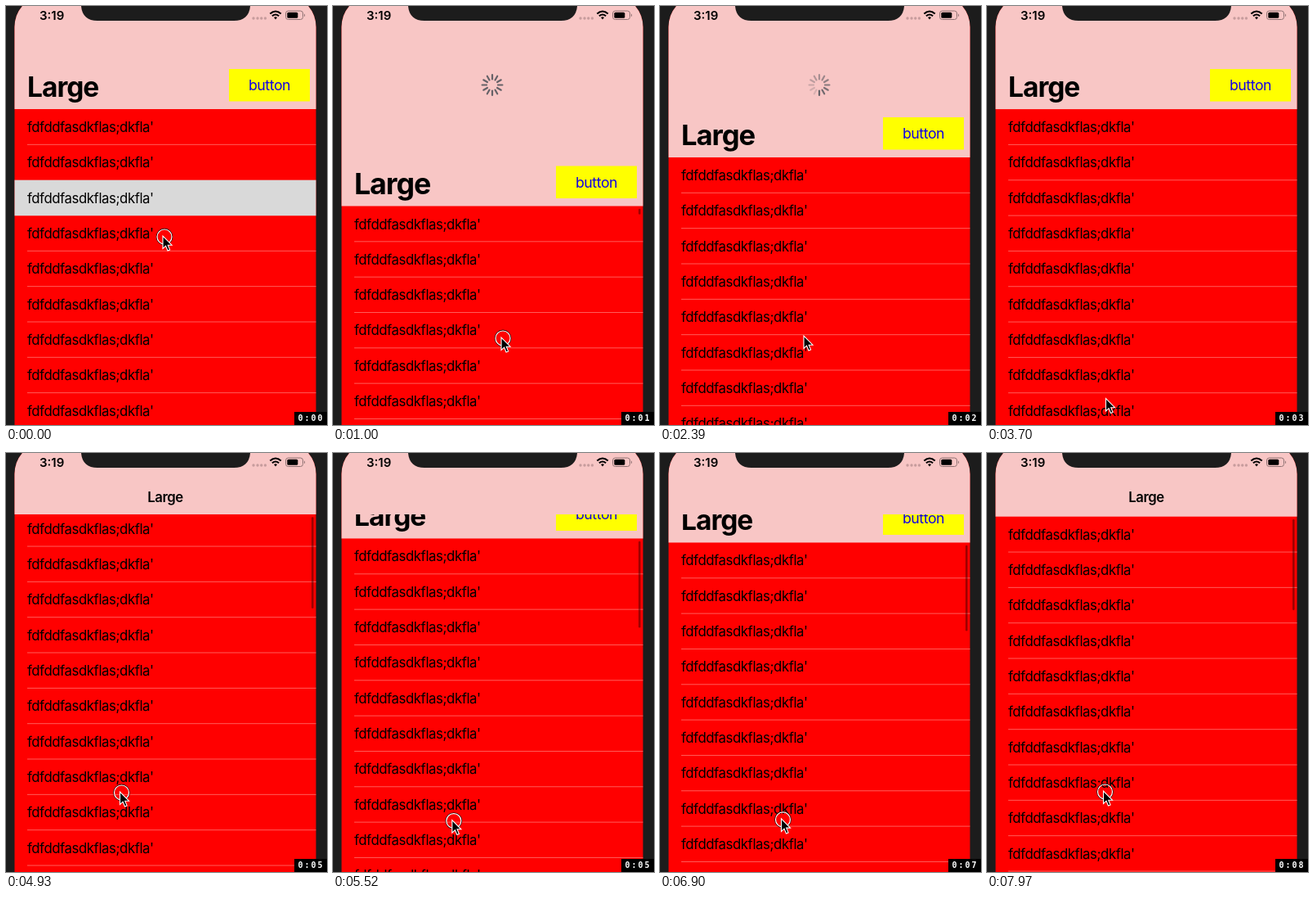
An HTML page that plays this animation: 393x512 px, repeating every 8000 ms.

```html
<!DOCTYPE html>
<html lang="en">
<head>
<meta charset="utf-8">
<title>Pull to refresh</title>
<style>
  html, body { margin: 0; width: 100%; height: 100%; overflow: hidden; background: #1c1c1c; }
  svg { display: block; width: 100%; height: 100%; }
  text { font-family: Inter, Roboto, sans-serif; font-optical-sizing: none; }
  .row { font-size: 16.75px; letter-spacing: -.42px; }
  .large { font-size: 33.5px; font-weight: 700; letter-spacing: -.03em; }
  .title { font-size: 16.75px; font-weight: 600; letter-spacing: -.42px; text-anchor: middle; }
  .button { font-size: 17.7px; letter-spacing: -.42px; text-anchor: middle; fill: #1200e6; }
  .time { font-size: 15px; font-weight: 600; }
  .clock { font: 700 10px "DejaVu Sans Mono", monospace; letter-spacing: 1.98px; fill: #fff; }
</style>
</head>
<body>
<svg viewBox="0 0 393 512">
  <defs>
    <clipPath id="screen"><path d="M10.5 512V26Q10.5 11 20 0H370Q379.5 11 379.5 26V512Z"/></clipPath>
    <clipPath id="belowBar"><rect y="75" width="393" height="437"/></clipPath>
  </defs>
  <rect width="393" height="512" fill="#1c1c1c"/>
  <g clip-path="url(#screen)">
    <rect width="393" height="512" fill="#f00"/>
    <g id="rows"><rect id="selected" x="10" y="86.66" width="370" height="43.6" fill="#d9d9d9"/></g>
    <rect id="header" width="393" height="126" fill="#f8c6c5"/>
    <rect id="bar" x="374" width="2.6" rx="1.3" fill="#000" fill-opacity=".38"/>
    <g id="spinner" stroke="#666268" stroke-width="2.2" stroke-linecap="round"></g>
    <g clip-path="url(#belowBar)">
      <g id="big">
        <text id="large" class="large">Large</text>
        <rect x="273" y="-49" width="99" height="39.5" fill="#ff0"/>
        <text class="button" x="322.5" y="-23">button</text>
      </g>
    </g>
    <text id="title" class="title" x="195" y="59.5">Large</text>
    <text class="time" x="41" y="16.7">3:19</text>
    <g fill="#c79c9d">
      <circle cx="303" cy="15" r="1.7"/><circle cx="308" cy="15" r="1.7"/>
      <circle cx="312.7" cy="15" r="1.7"/><circle cx="317.4" cy="15" r="1.7"/>
    </g>
    <g fill="none" stroke="#000" stroke-width="2.1">
      <path d="M323.3 9.6Q330 3.4 336.7 9.6M325.9 12.3Q330 8.7 334.1 12.3"/>
      <path d="M328 14L330 16.6 332 14Q330 12.4 328 14Z" fill="#000" stroke="none"/>
    </g>
    <rect x="342.5" y="6" width="21" height="10.5" rx="3" fill="none" stroke="#8f7273"/>
    <rect x="344.3" y="7.8" width="13" height="7" rx="1.5"/>
    <path d="M365 9.2Q367.2 11.2 365 13.4Z" fill="#8f7273"/>
  </g>
  <path d="M92 0C93 12 100 18 112 18H279C291 18 298 12 299 0Z" fill="#1c1c1c"/>
  <g id="cursor">
    <g id="press" fill="none">
      <circle cx="2" cy="1" r="9.6" stroke="#300" stroke-width="1.6"/>
      <circle cx="2" cy="1" r="9" stroke="#fff" stroke-width="1.2"/>
    </g>
    <path d="M0 0V15.5L3.6 12.2 6 18 8.6 16.9 6.2 11.2H11Z" stroke="#fff" stroke-width="1.1"/>
  </g>
  <rect x="353" y="496" width="40" height="16"/>
  <text id="clock" class="clock" x="357.6" y="507.3">0:00</text>
</svg>
<script>
const LOOP = 8000, ROW = 43.33, REST = 126, BAR = 75;
const $ = id => document.getElementById(id);
const clamp = x => Math.max(0, Math.min(1, x));
const linear = x => x;
const smooth = x => x * x * (3 - 2 * x);
const out = x => 1 - (1 - x) ** 3;

function add(parent, name, attrs, text = '') {
  const el = document.createElementNS('http://www.w3.org/2000/svg', name);
  for (const key in attrs) el.setAttribute(key, attrs[key]);
  el.textContent = text;
  parent.append(el);
  return el;
}

// Keys are [time, value, easing into this key].
function track(keys, t) {
  const i = keys.findIndex(k => k[0] > t);
  if (i < 0) return keys[keys.length - 1][1];
  if (i === 0) return keys[0][1];
  const [t0, v0] = keys[i - 1], [t1, v1, ease = linear] = keys[i];
  return v0 + (v1 - v0) * ease((t - t0) / (t1 - t0));
}

const listTop = [
  [50, 126], [530, 243, smooth], [670, 243], [760, 244.5], [1480, 244.5], [2050, 185, out],
  [3300, 185], [3710, 126, smooth], [4270, 126], [4930, 70.7, smooth], [5050, 70.7],
  [5820, 121.5, smooth], [5910, 122], [6170, 124], [6290, 126], [6490, 126],
  [6900, 109.5], [7970, 77.7]
];
const cursorX = [
  [50, 192], [530, 206, smooth], [1480, 206], [2390, 176, smooth], [2800, 176], [3640, 145.5, smooth],
  [4270, 145.5], [4930, 139.5, smooth], [5050, 139.5], [5820, 149, smooth],
  [6170, 151.5], [6490, 151.5], [6900, 148.5], [7970, 142.5]
];
const cursorY = [
  [50, 281], [530, 403.5, smooth], [670, 403.5], [760, 405], [1480, 405], [2390, 403, smooth],
  [2800, 403], [3640, 479.5, smooth], [4270, 479.5], [4930, 414, smooth], [5050, 414],
  [5820, 466, smooth], [6170, 469], [6290, 472], [6490, 472], [6900, 447], [7970, 413]
];
const presses = [[0, 1480], [4140, 6230], [6490, LOOP]];
const seconds = [1000, 1900, 2900, 3970, 4930, 5910, 6900, 7910];

for (let i = 0; i < 11; i++) {
  const y = i * ROW;
  add($('rows'), 'text', { class: 'row', x: 26, y: y + 28 }, "fdfddfasdkflas;dkfla'");
  const line = add($('rows'), 'rect', {
    x: 26, y: y + ROW - .5, width: 354, height: 1, fill: '#ff7d78', 'fill-opacity': .75
  });
  if (i === 1 || i === 2) line.dataset.nearSelected = true;
}
const hiddenLines = [...document.querySelectorAll('[data-near-selected]')];

const spokes = Array.from({ length: 12 }, (_, i) =>
  add($('spinner'), 'line', { y1: -7, y2: -12.4, transform: `rotate(${i * 30})` }));

function drawSpinner(t, top) {
  const spinning = t >= 1050 && t < 3710;
  const head = Math.floor((t - 849) / 1000 * 12);
  const shown = 12 * (top - 160) / 70;
  const leaving = t > 3300 ? clamp((top - REST) / 59) : 1;
  $('spinner').setAttribute('transform', `translate(195 96.5) scale(${leaving})`);
  $('spinner').setAttribute('opacity', t < 3710 ? leaving : 0);
  spokes.forEach((spoke, i) => {
    const age = (((head - i) % 12) + 12) % 12;
    spoke.setAttribute('opacity', spinning ? Math.max(.22, 1 - age * .075) : clamp(shown - i));
  });
}

function drawBar(t, header, top) {
  const length = top > REST ? Math.max(7, 101 - (top - REST)) : 101.5 + (REST - header) * .2;
  const alpha = t < 3000
    ? clamp((t - 60) / 100) * clamp((2330 - t) / 250)
    : clamp((t - 4280) / 60);
  $('bar').setAttribute('y', header + 3.3);
  $('bar').setAttribute('height', length);
  $('bar').setAttribute('opacity', alpha);
}

function draw(t) {
  const top = track(listTop, t), header = Math.max(BAR, top);
  const selected = t < 60;
  $('rows').setAttribute('transform', `translate(0 ${top})`);
  $('selected').setAttribute('opacity', selected ? 1 : 0);
  hiddenLines.forEach(line => line.setAttribute('opacity', selected ? 0 : 1));
  $('header').setAttribute('height', header);
  $('big').setAttribute('transform', `translate(0 ${top})`);
  const grow = 1 + Math.max(0, top - REST) * .00056;
  $('large').setAttribute('transform', `translate(26 -15) scale(${grow})`);
  $('title').setAttribute('opacity', clamp((92 - top) / 6));
  drawSpinner(t, top);
  drawBar(t, header, top);
  $('cursor').setAttribute('transform', `translate(${track(cursorX, t)} ${track(cursorY, t)})`);
  $('press').setAttribute('opacity', presses.some(([a, b]) => t >= a && t < b) ? 1 : 0);
  $('clock').textContent = '0:0' + seconds.filter(s => t >= s).length;
}

const start = performance.now();
function frame(now) {
  draw(Math.max(0, now - start) % LOOP);
  requestAnimationFrame(frame);
}
draw(0);
requestAnimationFrame(frame);
</script>
</body>
</html>
```
